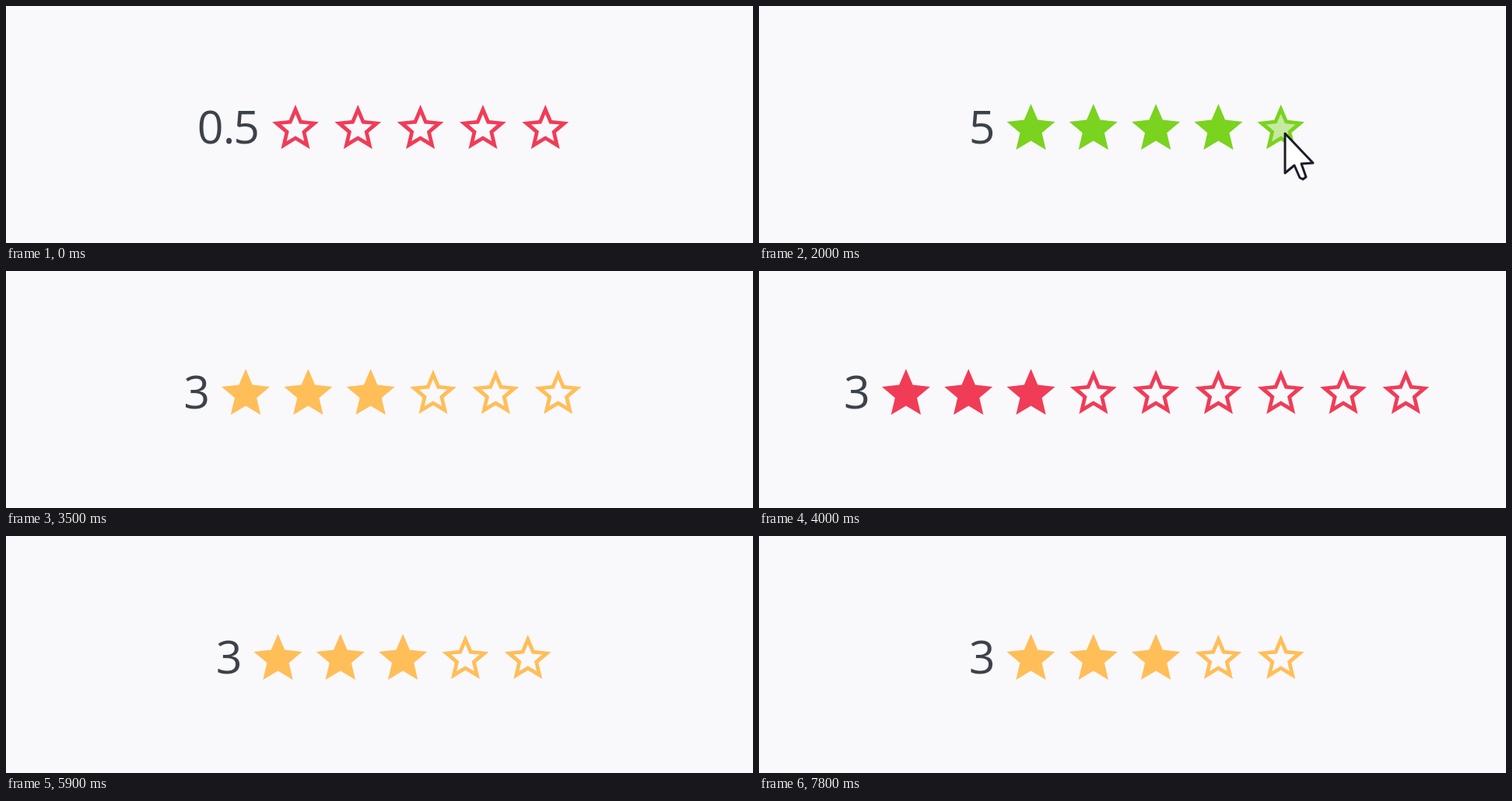
Write an HTML page with a canvas that moves like this. It is 960 by 305 pixels and loops after 8 s.

```html
<!DOCTYPE html>
<html lang="en">
<head>
<meta charset="utf-8">
<title>Star rating</title>
<style>
  html, body { margin: 0; width: 100%; height: 100%; overflow: hidden; background: #f9f8fb; }
  canvas { display: block; width: 960px; height: 305px; filter: blur(0.5px); }
</style>
</head>
<body>
<canvas id="stage" width="960" height="305"></canvas>
<script>
const ctx = document.getElementById('stage').getContext('2d');
const LOOP = 8000, STEP = 100, PITCH = 80.3, TOP = 126;

const RED = [240, 60, 87], YELLOW = [255, 190, 88], GREEN = [122, 211, 30], GRAY = [153, 153, 153];
const INK = '#3c424b';

// Each track is a list of [start time, value].
const ratings = [[0, 0.5], [800, 1], [1200, 2], [1400, 3], [1600, 4], [2000, 5], [3000, 3]];
const counts = [[0, 5], [3500, 6], [3600, 7], [3700, 8], [3800, 9], [4100, 10], [4300, 9],
  [4400, 8], [4500, 7], [4700, 6], [4900, 4], [5000, 3], [5400, 4], [5600, 5]];
const colors = [[0, RED], [1200, YELLOW], [1600, GREEN], [3000, YELLOW], [3800, RED], [4400, YELLOW],
  [5000, GREEN], [5600, YELLOW], [6800, GRAY], [7200, RED], [7600, YELLOW]];
// [time, x, y] of the pointer tip
const pointer = [[200, 300, 290], [800, 350, 178], [1000, 362, 204], [1300, 440, 185],
  [1600, 590, 172], [1900, 672, 166], [2000, 676, 164], [2700, 674, 171], [3000, 674, 171]];

// Right half of the star, from the top point to the bottom notch, in units of a 20 x 19 box.
const OUTER = [[0, 0], [2.81, 6.63], [10, 7.4], [4.54, 11.97], [6.18, 19], [0, 15.27]];
const INNER = [[0, 4.1], [1.71, 8.14], [6.09, 8.52], [2.77, 11.4], [3.77, 15.68], [0, 13.4]];
const ARROW = [[0, 0], [0, 51], [12, 41], [19, 57], [23, 59], [27, 56], [21, 39], [36, 38]];

const lerp = (a, b, p) => a + (b - a) * p;

function read(track, t) {
  let i = track.length - 1;
  while (i > 0 && track[i][0] > t) i--;
  const p = i ? Math.min(1, (t - track[i][0] + 90) / 220) : 1;
  return { now: track[i][1], before: track[Math.max(0, i - 1)][1], p };
}

function starPath(half, cx, scale) {
  const path = new Path2D();
  const mirrored = half.slice(1, -1).reverse().map(([x, y]) => [-x, y]);
  for (const [x, y] of [...half, ...mirrored]) {
    path.lineTo(cx + x * scale, TOP + 29.5 + (y - 9.5) * scale);
  }
  path.closePath();
  return path;
}

function drawStar(cx, fill, color) {
  ctx.fillStyle = color;
  if (fill >= 1) {
    ctx.fill(starPath(OUTER, cx, 3.1));
    return;
  }
  const scale = lerp(2.99, 3.1, fill);
  const hole = starPath(INNER, cx, scale);
  const ring = starPath(OUTER, cx, scale);
  ring.addPath(hole);
  ctx.fill(ring, 'evenodd');
  if (fill > 0) {
    ctx.globalAlpha = fill;
    ctx.fill(hole);
    ctx.globalAlpha = 1;
  }
}

function drawLabel(text, lastX) {
  ctx.font = '400 59px "Open Sans", "Noto Sans", sans-serif';
  ctx.textAlign = 'center';
  ctx.fillStyle = INK;
  const offsets = [0, -22.5, -46.5];
  [...text].reverse().forEach((ch, i) => ctx.fillText(ch, lastX + offsets[i], 177));
}

function drawPointer(t) {
  const i = pointer.findIndex(k => k[0] > t);
  if (i < 1) return;
  const [t0, x0, y0] = pointer[i - 1], [t1, x1, y1] = pointer[i];
  const p = (t - t0) / (t1 - t0);
  ctx.save();
  ctx.translate(lerp(x0, x1, p), lerp(y0, y1, p));
  ctx.beginPath();
  for (const [x, y] of ARROW) ctx.lineTo(x, y);
  ctx.closePath();
  ctx.fillStyle = '#fff';
  ctx.fill();
  ctx.lineWidth = 3;
  ctx.lineJoin = 'round';
  ctx.strokeStyle = '#1d1d2b';
  ctx.stroke();
  ctx.restore();
}

function draw(t) {
  ctx.fillStyle = '#f9f8fb';
  ctx.fillRect(0, 0, 960, 305);

  const rating = read(ratings, t), tint = read(colors, t), n = read(counts, t).now;
  const label = String(rating.now);
  const color = `rgb(${tint.now.map((c, i) => Math.round(lerp(tint.before[i], c, tint.p)))})`;
  const first = 349.5 - (n - 5) * PITCH / 2 - (n % 2 ? 0 : 1.3) + (label.length > 1 ? 22.5 : 0);

  drawLabel(label, first - 63);
  for (let i = 0; i < n; i++) {
    const on = value => (value >= i + 1 ? 1 : 0);
    drawStar(first + i * PITCH, lerp(on(rating.before), on(rating.now), rating.p), color);
  }
  drawPointer(t);
}

const start = performance.now();
function tick() {
  const t = (performance.now() - start) % LOOP;
  draw(Math.floor(t / STEP) * STEP);
  requestAnimationFrame(tick);
}
tick();
</script>
</body>
</html>
```
